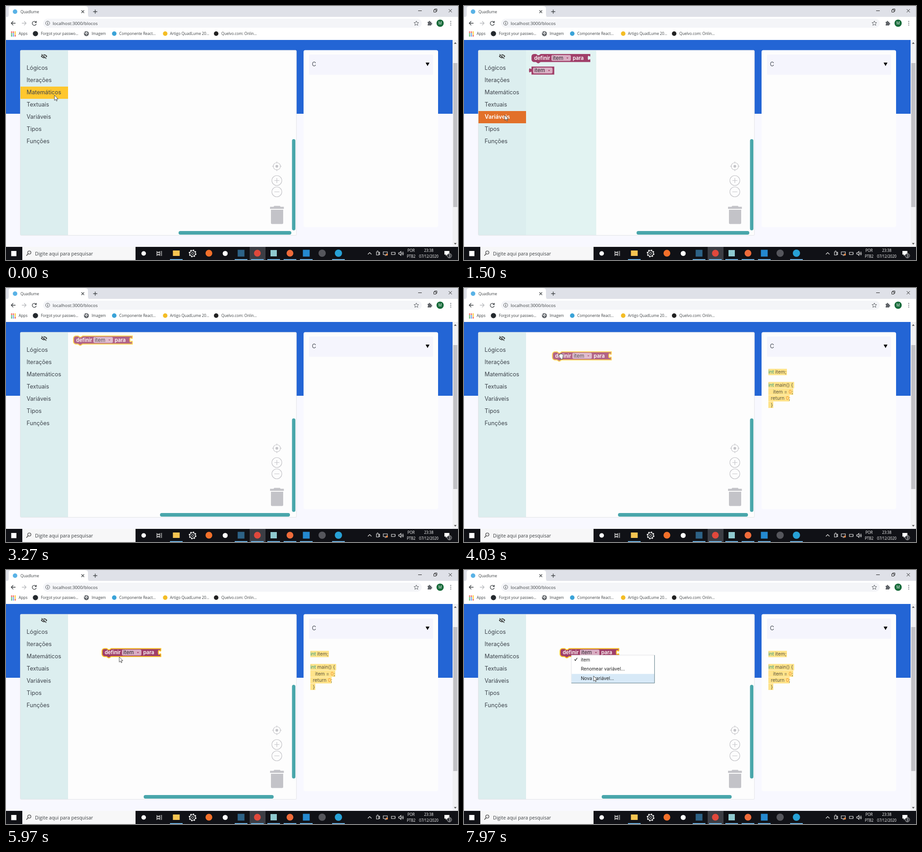
Recreate the animation shown at these times as an HTML page. Size 998 by 561 pixels, loop 8000 ms.

```html
<!DOCTYPE html>
<html lang="pt-BR">
<head>
<meta charset="utf-8">
<title>Blocos</title>
<style>
html,body{margin:0;width:100%;height:100%;overflow:hidden;background:#f8f8ff}
svg{display:block;width:998px;height:561px}
text{white-space:pre}
.ui{font-family:"Open Sans","Noto Sans",sans-serif;font-size:8.3px;fill:#3c4043}
.app{font-family:Inter,sans-serif;font-size:12.6px;fill:#3d434b}
.line{fill:none;stroke:#3c4043;stroke-width:1.3}
</style>
</head>
<body>
<svg id="stage" viewBox="0 0 998 561" xmlns="http://www.w3.org/2000/svg"></svg>
<script>
const LOOP = 8000, PURPLE = '#a03f69';
const stage = document.getElementById('stage');

const rect = (x, y, w, h, fill, extra = '') =>
  `<rect x="${x}" y="${y}" width="${w}" height="${h}" fill="${fill}" ${extra}/>`;
const dot = (x, y, r, fill, extra = '') => `<circle cx="${x}" cy="${y}" r="${r}" fill="${fill}" ${extra}/>`;
const path = (d, extra = 'class="line"') => `<path d="${d}" ${extra}/>`;
const ui = (x, y, s, extra = '') => `<text class="ui" x="${x}" y="${y}" ${extra}>${s}</text>`;
const app = (x, y, s, extra = '') => `<text class="app" x="${x}" y="${y}" ${extra}>${s}</text>`;
const group = (id, body) => `<g id="${id}">${body}</g>`;

function browser() {
  const apps = ['#ea4335', '#ea4335', '#fbbc05', '#34a853', '#4285f4', '#fbbc05', '#34a853', '#4285f4', '#ea4335'];
  return rect(0, 0, 998, 25, '#dfe1e8') + rect(0, 24, 998, 51, '#fff') +
    path('M0 25Q6 25 6 19V6Q6 0 12 0H174Q181 0 181 6V19Q181 25 187 25Z', 'fill="#fff"') +
    dot(20, 12.5, 5, '#59b2e6') + ui(32, 15.5, 'Quadlume') +
    path('M166.5 9.5l6 6m0-6l-6 6M192.5 12.5h9m-4.5-4.5v9') +
    path('M910 10.5h8M944.5 8.5h5v5h-5zM946.5 8v-1.5h5v5h-1.5M977.5 7l7 7m0-7l-7 7', 'fill="none" stroke="#222"') +
    path('M21 38H11.5m4.5-4.5l-4.5 4.5 4.5 4.5') +
    path('M35 38h9.5m-4.5-4.5l4.5 4.5-4.5 4.5', 'fill="none" stroke="#b9bbbe" stroke-width="1.3"') +
    path('M66 35.5a4.5 4.5 0 1 0 .8 4M67 33v3.5h-3.5') +
    rect(82, 28, 836, 20, '#f4f5f8', 'rx="10"') +
    dot(92, 38, 4.5, 'none', 'stroke="#5f6368"') + path('M92 37.5v3M92 35.2v1.2') +
    ui(103, 41.5, 'localhost:3000/blocos', 'style="font-size:9.8px"') +
    path('M906 33l1.5 3.4 3.7.3-2.8 2.4.9 3.7-3.3-2-3.3 2 .9-3.7-2.8-2.4 3.7-.3z', 'fill="none" stroke="#5f6368"') +
    path('M931 35h2.5a1.6 1.6 0 1 1 3 0h2.5v2.7a1.6 1.6 0 1 1 0 3v2.3h-8v-2.6a1.6 1.6 0 0 0 0-3z', 'fill="#5f6368"') +
    dot(958.5, 38, 8, '#176b3a') + ui(958.5, 41, 'M', 'text-anchor="middle" style="fill:#fff"') +
    [34, 38, 42].map(y => dot(982, y, 1.1, '#5f6368')).join('') +
    apps.map((c, i) => rect(11 + i % 3 * 4, 56.5 + (i / 3 | 0) * 4, 2.6, 2.6, c)).join('') +
    ui(28, 64, 'Apps') + dot(65, 61, 5.8, '#24292e') + ui(77, 64, 'Forgot your passwo...') +
    dot(177.5, 61, 5.5, '#5f6368') + path('M173 59l4 2 1 3m1-7l-2 2 4 2', 'fill="none" stroke="#fff" stroke-width="1.2"') +
    ui(189, 64, 'Imagem') + dot(239, 61, 5, '#3aa3d8') + ui(250, 64, 'Componente React...') +
    dot(351.5, 61, 5, '#f4bd25') + ui(362, 64, 'Artigo QuadLume 20...') +
    dot(464, 61, 5, '#222') + ui(475.5, 64, 'Quelvo.com: Onlin...');
}

function taskbar() {
  const thin = 'fill="none" stroke="#eee" stroke-width="1.1"';
  const icons = [[448, 7.5, '#f2702a'], [519, 7.5, '#2d6286', 1], [555, 7.5, '#e0483c'], [591, 7, '#8fc9cf', 1],
    [627, 7.5, '#ee6b3a'], [663, 7.5, '#2489d0', 1], [698, 8, '#55565c'], [734, 8, '#27a1d6']];
  const icon = ([x, r, c, square]) => square ? rect(x - r, 546 - r, 2 * r, 2 * r, c) : dot(x, 546, r, c);
  const note = (x, y, s) => ui(x, y, s, 'text-anchor="middle" style="fill:#fff;font-size:8.1px"');
  return rect(0, 532, 998, 29, '#101116') + rect(11.5, 541, 11.5, 11.5, '#fff') +
    rect(36, 532, 250, 29, '#f7f7f8') + dot(51.5, 544.5, 3.5, 'none', 'stroke="#333" stroke-width="1.2"') +
    path('M49 547l-4 4.5', 'stroke="#333" stroke-width="1.2"') +
    ui(64, 550.5, 'Digite aqui para pesquisar', 'style="font-size:10.5px"') + dot(304, 546.5, 5, '#fff') +
    path('M333 541.5v2h7v-2M333 552v-2h7v2M333 545h7v3.5h-7zM343.5 541v11', thin) +
    rect(368.5, 540, 15, 12, '#f5c451') +
    dot(412, 546.5, 7, 'none', 'stroke="#eee" stroke-width="3" stroke-dasharray="3.2 2.3"') +
    dot(412, 546.5, 6, '#101116', 'stroke="#eee" stroke-width="1.2"') + dot(412, 546.5, 2.4, 'none', 'stroke="#eee"') +
    dot(484, 546.5, 5.5, '#fff') + rect(538, 532, 35, 29, '#3c3e45') + icons.map(icon).join('') +
    [376, 519, 555, 591, 627, 663, 734].map(x => rect(x - 14, 559, 28, 2, '#6fb4e4')).join('') +
    path('M799 548.5l4-4 4 4M818 543h5v7h-5zM819 541h3M823 545l2-1v5l-2-1M833 543h9v6h-9zM836 551h4M851 544h8v5h-8z' +
      'M859.5 545.5v2M867 545h2l3-3v9l-3-3h-2zM874 544q2 2.5 0 5M876 542.5q3 4 0 8', thin) +
    dot(841, 549, 2.2, '#f08a45') +
    note(894.5, 543, 'POR') + note(894.5, 556, 'PTB2') + note(933.5, 543, '23:38') + note(933.5, 556, '07/12/2020') +
    path('M968 541h11v8h-5l-3 3v-3h-3z', 'fill="#fff"') + dot(979, 551.5, 5, '#2b2d33', 'stroke="#ddd" stroke-width=".8"') +
    note(979, 554.5, '3');
}

function page() {
  const labels = ['Lógicos', 'Iterações', 'Matemáticos', 'Textuais', 'Variáveis', 'Tipos', 'Funções'];
  const grey = 'fill="none" stroke="#c4c4c8" stroke-width="1.2"';
  return rect(0, 75, 986, 457, '#f8f8ff') + rect(0, 75, 986, 163, '#2365d5') +
    rect(986, 75, 12, 457, '#f1f1f3') + rect(987.5, 126, 9, 318, '#c1c1c5') +
    path('M989 83.5l3-3.5 3 3.5zM989 523.5l3 3.5 3-3.5z', 'fill="#505050"') +
    rect(31.5, 97.8, 609.8, 408.7, '#fdfdfd', 'stroke="#dcdde0" stroke-width=".8" rx="2"') +
    rect(32, 98, 105, 408, '#dceeef') +
    path('M78 111q6-7 12 0q-6 7-12 0z', 'fill="none" stroke="#333" stroke-width="1.6"') + dot(84, 111, 2.2, '#333') +
    path('M79 106l10.5 10', 'stroke="#dceeef" stroke-width="2.5"') + path('M78.5 106.5l10.5 10', 'stroke="#333" stroke-width="1.3"') +
    rect(32, 0, 105, 27, '#ffc72e', 'id="hover"') + rect(32, 232, 105, 27, '#e27029', 'id="picked"') +
    labels.map((s, i) => app(45.5, 141 + 27 * i, s, `id="row${i}"`)).join('') +
    rect(657, 97.5, 297, 391, '#fdfdfd', 'rx="4"') + rect(669, 107, 274, 45, '#f5f5fd', 'rx="2"') +
    app(675.5, 133.3, 'C') + path('M926.5 125h8.5l-4.25 7.5z', 'fill="#000"') +
    dot(598, 354, 8, 'none', grey) + dot(598, 354, 3, '#c4c4c8') +
    path('M598 343.5v4M598 360.5v4M587.5 354h4M604.5 354h4', grey) +
    dot(598, 385.5, 11, 'none', grey) + dot(598, 410.5, 11, 'none', grey) +
    path('M592.5 385.5h11m-5.5-5.5v11M592.5 410.5h11', grey) +
    path('M583 443.5h8l1-2h13l1 2h7.5v4.5H583zM585 450h27v29q0 2.5-2.5 2.5h-22q-2.5 0-2.5-2.5z', 'fill="#c3c3c8"');
}

const SETTER = 'M0 8A8 8 0 0 1 8 0H15l6 4h3l6-4H191v5c0 10-8-8-8 7.5s8-2.5 8 7.5v6H29.5l-6 4h-3l-6-4H8a8 8 0 0 1-8-8z';
const GETTER = 'M0 0H74V26H0V20c0-10-8 8-8-7.5s8 2.5 8-7.5z';
const shape = (d, extra = '') => path(d, `transform="scale(.68)" fill="${PURPLE}" ${extra}`);
const field = x => rect(x, 2.3, 43, 13, '#d9aec3', 'rx="3"') +
  app(x + 3, 12.7, 'item', 'style="font-size:11.5px;fill:#2c2630"') +
  path(`M${x + 33} 7.8h4.6l-2.3 2.8z`, `fill="${PURPLE}"`);
const word = (x, s) => app(x, 12.7, s, 'style="font-size:11.2px;font-weight:600;fill:#fff"');
const setter = (outline = '') => shape(SETTER, outline) + word(6, 'definir') + field(44) + word(91, 'para');

function code() {
  const int = '<tspan fill="#2a9c84">int</tspan>', zero = '<tspan fill="#f28c22">0</tspan>';
  const lines = [
    [189, 672, 41, `${int} item;`], [218, 672, 57, `${int} main() {`],
    [232.5, 682.5, 55, `item = ${zero};`], [247, 677.5, 47, `return ${zero};`], [261.5, 677.5, 11, '}']];
  return lines.map(([y, x, w, s]) => rect(672, y - 10.5, w, 14, '#ffe389') +
    app(x, y, s, 'style="font-size:10.6px;fill:#5b5640"')).join('');
}

function menu() {
  const item = (y, s) => app(258, y, s, 'style="font-size:10.1px;fill:#222"');
  return rect(237, 188, 183.5, 61.5, '#fff', 'stroke="#c9cdd2" stroke-width=".6"') +
    rect(237.5, 0, 182.5, 20, '#d7e9f7', 'id="choice"') +
    path('M237 249.7H420.7V188', 'fill="none" stroke="#5c7b86"') +
    path('M244 197.5l2 2.5 4-6', 'fill="none" stroke="#222" stroke-width="1.3"') +
    item(202, 'item') + item(222, 'Renomear variável...') + item(242.5, 'Nova variável...');
}

const pen = 'fill="#fff" stroke="#222" stroke-width=".8"';
stage.innerHTML = page() +
  rect(0, 497, 0, 8, '#49a6ab', 'id="barX" rx="4"') + rect(631.5, 0, 7.5, 0, '#49a6ab', 'id="barY" rx="3.75"') +
  group('flyout', rect(137, 98.5, 155, 407.5, '#e2f3f2') +
    `<g transform="translate(149 106)">${setter()}</g>` +
    `<g transform="translate(149 133.7)">${shape(GETTER)}${field(3.5)}</g>`) +
  group('block', setter('stroke="#fcc627" stroke-width="3"')) +
  group('code', code()) + group('menu', menu()) + browser() + taskbar() +
  group('arrow', path('M0 0V11.5l2.7-2.4 1.7 3.9 1.7-.8-1.7-3.8h3.6z', pen)) +
  group('hand', path('M-4-1q-1-3 1-3q0-2 2-1q1-1.5 2.5 0q2-.7 2.2 1q1.8 0 1.3 3l-1 5v2h-5v-2q-3-3-3-5z', pen));

const el = {};
stage.querySelectorAll('[id]').forEach(n => el[n.id] = n);

const OPEN = 1000, GRAB = 3130, WAKE = 3400, DROP = 5230, MENU = 6730;
const pointer = [[0, 107, 197], [150, 107, 197], [800, 91, 241], [1600, 90, 241], [1850, 130, 242],
  [2450, 168, 116], [WAKE, 168, 116], [4030, 214, 151], [4630, 231, 173], [5050, 232, 183], [5450, 232, 183],
  [5970, 250, 192], [6500, 289, 181], [6950, 289, 181], [7600, 286, 234], [LOOP, 286, 234]];
const drag = [[0, 149, 106], [WAKE, 149, 106], [4030, 195.3, 141], [4630, 211.3, 163], [5050, 212, 173.5], [LOOP, 212, 173.5]];

function at(track, t) {
  const i = track.findIndex(k => k[0] > t);
  const [a, b] = [track[i - 1], track[i]];
  const p = (t - a[0]) / (b[0] - a[0]), e = (p + p * p * (3 - 2 * p)) / 2;
  return [a[1] + (b[1] - a[1]) * e, a[2] + (b[2] - a[2]) * e];
}
const show = (node, on) => node.style.display = on ? '' : 'none';
const set = (node, attrs) => { for (const k in attrs) node.setAttribute(k, attrs[k]); };

function draw(t) {
  const [x, y] = at(pointer, t), [bx, by] = at(drag, t);
  const open = t >= OPEN && t < GRAB, dragging = t >= GRAB && t < DROP;
  const row = Math.floor((y - 124) / 27);
  show(el.hover, x > 32 && x < 137 && row >= 0 && row < 7 && !(open && row === 4));
  set(el.hover, { y: 124 + 27 * row });
  show(el.picked, open);
  set(el.row4, { style: open ? 'fill:#fff;font-weight:600' : '' });
  show(el.flyout, open);
  show(el.block, t >= GRAB);
  set(el.block, { transform: `translate(${bx} ${by})`, opacity: dragging ? .8 : 1 });
  show(el.code, t >= WAKE);

  const [x0, x1, y0, y1] = t < GRAB ? [381, 630, 294, 495.5] : t < DROP ? [340, 627, 288, 494.5] : [304, 591, 253.5, 460.5];
  set(el.barX, { x: x0, width: x1 - x0 });
  set(el.barY, { y: y0, height: y1 - y0 });

  show(el.menu, t >= MENU);
  const choice = Math.floor((y - 188) / 20.5);
  show(el.choice, choice >= 0 && choice < 3);
  set(el.choice, { y: 188.5 + 20.5 * choice });

  const grip = t >= 2350 && t < DROP, frozen = t >= GRAB && t < WAKE;
  show(el.arrow, !grip);
  show(el.hand, grip && !frozen);
  set(grip ? el.hand : el.arrow, { transform: `translate(${x} ${y})` });
}

const start = performance.now();
function tick() {
  draw((performance.now() - start) % LOOP);
  requestAnimationFrame(tick);
}
tick();
</script>
</body>
</html>
```
